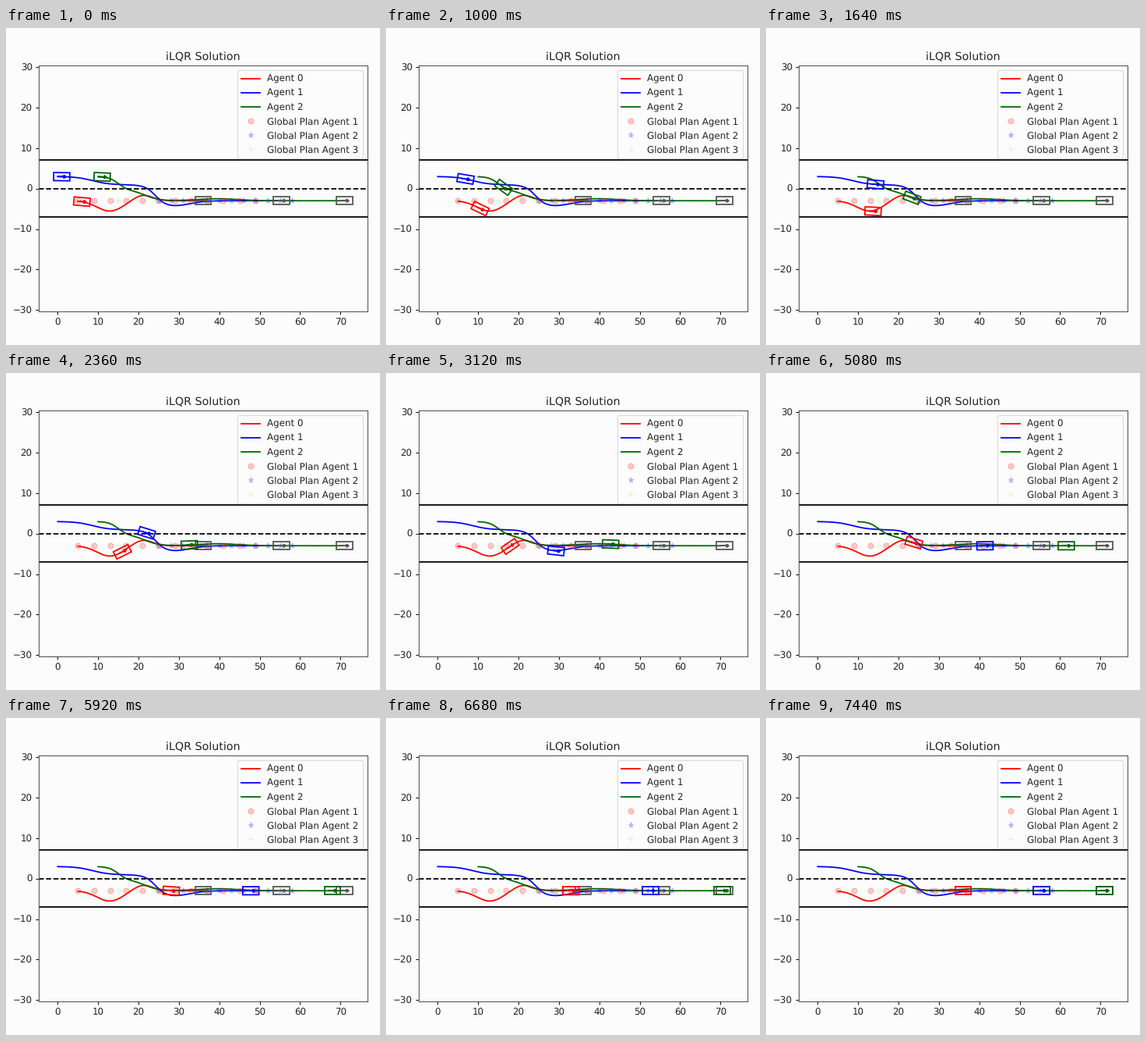
A matplotlib script for the animation above (9.28 s loop, 480 by 406 pixels).

```python
import numpy as np
import matplotlib.pyplot as plt
from matplotlib.animation import FuncAnimation
from matplotlib.patches import FancyArrow, Polygon

W, H, DPI = 480, 406, 85
LOOP, STEP = 9280, 40
HOLD = 2  # frames per simulation step
BG, INK = "#fcfcfc", "#222222"

plt.rcParams.update({
    "font.family": "DejaVu Sans", "font.size": 10.1, "text.hinting": "none",
    "figure.facecolor": BG, "axes.facecolor": BG, "axes.edgecolor": "#444444",
    "text.color": INK, "xtick.labelcolor": INK, "ytick.labelcolor": INK})


def drop(x, mid, width, depth):
    """S-shaped descent."""
    return -depth / (1 + np.exp((mid - x) / width))


def bump(x, mid, width, height):
    return height * np.exp(-0.5 * ((x - mid) / width) ** 2)


def red_path(x):
    return -3 + bump(x, 12.9, 3.2, -2.55) + bump(x, 21.1, 2.4, 1.4)


def blue_path(x):
    return (3 + drop(x, 8.6, 2.07, 2.05) + drop(x, 24.15, 1.16, 3.95)
            + bump(x, 28.6, 4, -1.25))


def green_path(x):
    return (3 + drop(x, 15, 1.2, 3.4) + drop(x, 21.8, 1.7, 2.6)
            + bump(x, 39.5, 5, 0.5))


def glide(q, xs, ys):
    """Smooth cubic through key points, at rest at both ends."""
    xs, ys = np.array(xs, float), np.array(ys, float)
    m = np.gradient(ys, xs)
    m[[0, -1]] = 0
    q = min(max(q, xs[0]), xs[-1])
    i = min(np.searchsorted(xs, q, side="right") - 1, len(xs) - 2)
    h = xs[i + 1] - xs[i]
    u = (q - xs[i]) / h
    return (ys[i] + u * u * (3 - 2 * u) * (ys[i + 1] - ys[i])
            + u * (1 - u) * h * ((1 - u) * m[i] - u * m[i + 1]))


class Car:
    """Box from one unit behind the rear axle to three ahead, with an arrow."""
    CORNERS = np.array([(-1, -1), (3, -1), (3, 1), (-1, 1)])

    def __init__(self, ax, color, z):
        self.box = ax.add_patch(Polygon(self.CORNERS, fill=False, ec=color,
                                        lw=1.5, zorder=z))
        self.arrow = ax.add_patch(FancyArrow(0, 0, 1.5, 0, width=0.001,
                                             head_width=0.8, head_length=0.6,
                                             color=color, lw=1.3, zorder=z))

    def place(self, x, y, angle=0.0):
        c, s = np.cos(angle), np.sin(angle)
        self.box.set_xy(self.CORNERS @ np.array([(c, s), (-s, c)]) + (x, y))
        self.arrow.set_data(x=x, y=y, dx=1.5 * c, dy=1.5 * s)


# Rear axle x at a few simulation steps
key_steps = [0, 12, 20, 39, 54, 74, 92]
agents = [
    ("red", red_path, [5, 9.6, 12.7, 17.1, 20, 27.1, 35]),
    ("blue", blue_path, [0, 5.9, 13.3, 28.3, 35.2, 46.8, 54.4]),
    ("darkgreen", green_path, [10, 15.5, 22.4, 41.8, 53.8, 67, 70]),
]

fig = plt.figure(figsize=((W + 1e-6) / DPI, (H + 1e-6) / DPI), dpi=DPI)
ax = fig.add_axes([42 / W, (H - 363) / H, 422 / W, 314.6 / H])
ax.set_xlim(-4.7, 76.7)
ax.set_ylim(-30.35, 30.35)
ax.set_xticks(range(0, 71, 10))
ax.set_yticks(range(-30, 31, 10))
ax.set_title("iLQR Solution")

for i, (color, path, keys) in enumerate(agents):
    xs = np.linspace(keys[0], keys[-1], 300)
    ax.plot(xs, path(xs), color=color, label=f"Agent {i}")

plans = [(5, 49, "o", "red", 0.2), (25, 58, "*", "blue", 0.2),
         (15, 66, "+", "lime", 0.16)]
for i, (a, b, mark, color, alpha) in enumerate(plans, 1):
    ax.plot(np.linspace(a, b, 12), np.full(12, -3), mark, color=color,
            alpha=alpha, label=f"Global Plan Agent {i}")

for y, style in ((7, "-"), (-7, "-"), (0, "--")):
    ax.axhline(y, color="black", ls=style)

for _, _, keys in agents:
    Car(ax, "#555555", 3).place(keys[-1], -3)
cars = [Car(ax, color, 4) for color, _, _ in agents]

legend = ax.legend(loc="upper right", labelspacing=0.545, borderpad=0.45)
legend.get_frame().set_edgecolor("#d4d4d4")


def draw(n):
    step = n // HOLD
    for car, (_, path, keys) in zip(cars, agents):
        x = glide(step, key_steps, keys)
        slope = (path(x + 0.05) - path(x - 0.05)) / 0.1
        car.place(x, path(x), np.arctan(slope))
    return []


anim = FuncAnimation(fig, draw, frames=LOOP // STEP, interval=STEP,
                     repeat=True, repeat_delay=0, blit=False)
plt.show()
```
